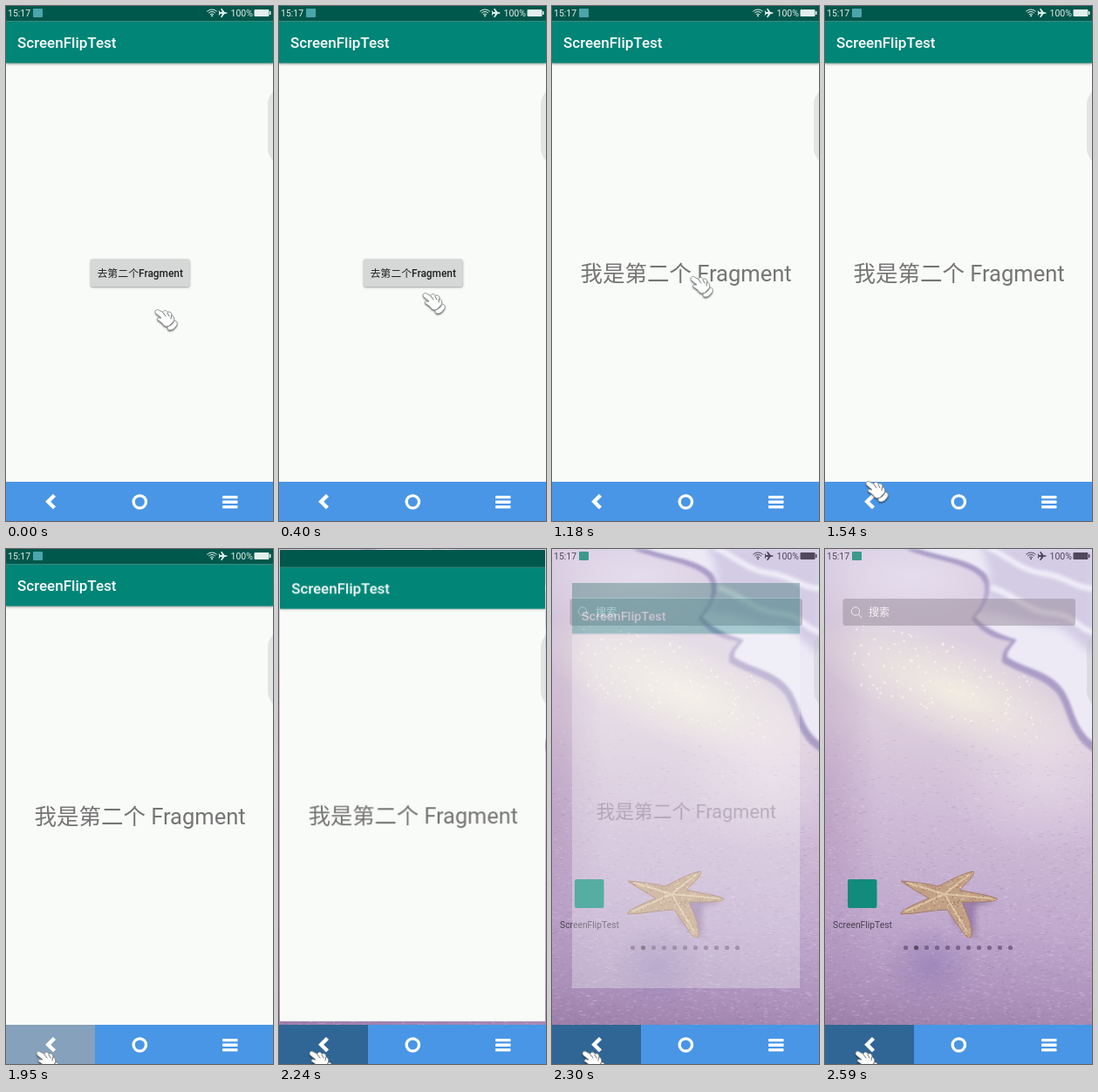
Animation of 306x591 px, one loop 2750 ms. Source, as an HTML page with a canvas:

```html
<!DOCTYPE html>
<html lang="zh-CN">
<head>
<meta charset="utf-8">
<title>Fragment demo</title>
<style>
html, body { margin: 0; width: 100%; height: 100%; overflow: hidden; }
canvas { display: block; width: 306px; height: 591px; }
</style>
</head>
<body>
<canvas id="stage" width="306" height="591"></canvas>
<script>
const W = 306, H = 591, NAV_Y = 546, LOOP = 2750, STEP = 30, CLOSE = 2240;
const APP_NAME = 'ScreenFlipTest';
const FONT = 'Roboto, "Noto Sans CJK SC", "Noto Sans CJK", sans-serif';
const stage = document.getElementById('stage').getContext('2d');

const clamp = v => Math.min(1, Math.max(0, v));
const lerp = (a, b, p) => a + (b - a) * p;
const mix = (a, b, p) => `rgb(${a.map((v, i) => Math.round(lerp(v, b[i], p)))})`;
const snap = (t, from) => from + Math.floor((t - from) / STEP) * STEP;

function layer() {
  const c = document.createElement('canvas');
  c.width = W;
  c.height = NAV_Y;
  return c.getContext('2d');
}

function rect(g, x, y, w, h, color, r = 0) {
  g.fillStyle = color;
  g.beginPath();
  g.roundRect(x, y, w, h, r);
  g.fill();
}

function disc(g, x, y, r, color) {
  g.fillStyle = color;
  g.beginPath();
  g.arc(x, y, r, 0, Math.PI * 2);
  g.fill();
}

function text(g, str, x, y, size, color, weight = 400, align = 'left') {
  g.font = `${weight} ${size}px ${FONT}`;
  g.textAlign = align;
  g.textBaseline = 'alphabetic';
  g.fillStyle = color;
  g.fillText(str, x, y);
}

function shape(g, d, fill, stroke, width = 1) {
  const p = new Path2D(d);
  if (fill) { g.fillStyle = fill; g.fill(p); }
  if (stroke) { g.strokeStyle = stroke; g.lineWidth = width; g.stroke(p); }
}

function statusBar(g, color, badge) {
  text(g, '15:17', 2, 12, 10.5, color);
  rect(g, 31, 3, 11, 10, badge, 1);
  g.strokeStyle = color;
  g.lineWidth = 1;
  for (const r of [3, 5.5, 8]) {
    g.beginPath();
    g.arc(236, 12, r, -Math.PI * .75, -Math.PI * .25);
    g.stroke();
  }
  disc(g, 236, 11.3, 1, color);
  shape(g, 'M254 8Q253 7 250.5 7L247.5 3H246L247.8 7H245.6L244.5 5.5H243.6L244.3 8L243.6 10.5H244.5L245.6 9H247.8L246 13H247.5L250.5 9Q253 9 254 8Z', color);
  text(g, '100%', 257.5, 12, 10.5, color);
  rect(g, 284.5, 4, 17, 8, color, 1);
  rect(g, 302, 6, 1.5, 4, color);
}

function withShadow(g, blur, dy, alpha, draw) {
  g.save();
  g.shadowColor = `rgba(0,0,0,${alpha})`;
  g.shadowBlur = blur;
  g.shadowOffsetY = dy;
  draw();
  g.restore();
}

function drawApp(g, t) {
  const closing = t >= CLOSE;
  // The closing window has a taller, empty status area.
  const inset = closing ? 20.4 : 17.5;
  rect(g, 0, 0, W, NAV_Y, '#f9fbf8');
  withShadow(g, 3, 1, .4, () => rect(g, 0, inset, W, 48, '#008577'));
  rect(g, 0, 0, W, inset, '#00574b');
  if (!closing) statusBar(g, '#e2efec', '#4ba5ad');
  text(g, APP_NAME, 13, inset + 30.5, 17, '#fff', 500);

  if (t >= 1180) {
    text(g, '我是第二个 Fragment', 153.5, 315.5 + (inset - 17.5) / 2, 25.5, '#757575', 400, 'center');
    return;
  }
  const press = clamp((snap(t, 850) - 850) / 270);
  withShadow(g, lerp(2.5, 6, press), lerp(1, 2.5, press), .38,
    () => rect(g, 97, 290.5, 113.5, 31.5, '#d6d7d7', 2));
  if (press > 0) {
    g.save();
    g.beginPath();
    g.roundRect(97, 290.5, 113.5, 31.5, 2);
    g.clip();
    rect(g, 97, 290, 114, 33, `rgba(0,0,0,${.07 * press})`);
    disc(g, lerp(160, 153.5, press), 307, 65 * press, 'rgba(0,0,0,.09)');
    g.restore();
  }
  text(g, '去第二个Fragment', 153.7, 310.5, 11.9, '#202222', 500, 'center');
}

function glow(g, x, y, rx, ry, rgb, alpha, angle = 0) {
  g.save();
  g.translate(x, y);
  g.rotate(angle);
  g.scale(rx, ry);
  const grad = g.createRadialGradient(0, 0, 0, 0, 0, 1);
  grad.addColorStop(0, `rgba(${rgb},${alpha})`);
  grad.addColorStop(1, `rgba(${rgb},0)`);
  g.fillStyle = grad;
  g.fillRect(-1, -1, 2, 2);
  g.restore();
}

function drawFoam(g) {
  g.save();
  g.filter = 'blur(1.5px)';
  shape(g, 'M92 0C125 14 158 14 178 32C190 46 180 66 168 80C182 100 200 104 214 106C206 114 202 120 203 130C224 144 250 146 267 167C279 186 280 216 308 233V0Z', '#ab9cc6');
  shape(g, 'M98 -4C130 10 164 9 184 28C196 44 186 66 172 78C188 94 206 100 220 104C212 114 208 118 209 124C230 138 258 139 274 163C286 182 286 208 310 223V-4Z', '#edeaf6');
  g.filter = 'blur(5px)';
  shape(g, 'M175 -4C196 20 190 58 176 74C206 70 232 90 262 88C284 96 290 112 310 122V-4Z', 'rgba(205,197,226,.8)');
  g.filter = 'blur(2px)';
  shape(g, 'M186 -2C210 8 222 24 250 28S284 44 310 46M190 44C214 50 232 72 260 74S288 92 310 96', null, '#f3f1fa', 6);
  g.restore();
}

function drawStarfish(g, rnd) {
  const arms = 'M87 381C100 382 118 384 129 387C141 382 157 372 170 370Q174 373 154 391C168 395 184 396 197 401Q199 406 157 405C162 418 170 432 168 445Q164 449 156 437L140 414C122 414 105 419 87 419Q84 415 119 401C108 394 96 388 87 381Z';
  g.save();
  g.filter = 'blur(3px)';
  shape(g, 'M150 394L196 404L172 410L172 446L146 426Z', 'rgba(104,72,130,.45)');
  g.restore();
  g.save();
  g.lineJoin = 'round';
  shape(g, arms, '#c2a085', '#a17c6c', 1);
  shape(g, 'M94 383L137 396L166 373M137 396L192 401M137 396L163 439M137 396L92 416', null, '#dcc3a2', 2);
  g.clip(new Path2D(arms));
  for (let i = 0; i < 500; i++) {
    disc(g, 85 + rnd() * 114, 369 + rnd() * 78, .8, i % 2 ? 'rgba(110,72,62,.4)' : 'rgba(250,232,200,.55)');
  }
  g.restore();
}

function drawBeach(g) {
  const sand = g.createLinearGradient(0, 0, -50, NAV_Y);
  [[0, '#d6cadf'], [.2, '#dccfdf'], [.35, '#dccddd'], [.55, '#cebad6'],
   [.75, '#c0a9cd'], [.9, '#ad93bc'], [1, '#9b7ea8']].forEach(s => sand.addColorStop(...s));
  g.fillStyle = sand;
  g.fillRect(0, 0, W, NAV_Y);
  glow(g, 0, 300, 60, 320, '160,125,170', .35);
  glow(g, 150, 165, 180, 62, '250,246,226', .75, .4);
  glow(g, 250, 260, 110, 90, '240,228,238', .5);
  glow(g, 100, 30, 140, 75, '240,236,250', .55);

  let seed = 7;
  const rnd = () => (seed = seed * 16807 % 2147483647) / 2147483647;
  for (let i = 0; i < 3200; i++) {
    const y = 180 + Math.sqrt(rnd()) * 366;
    rect(g, rnd() * W, y, 1 + rnd() * 4, 1, i % 2 ? 'rgba(110,75,135,.12)' : 'rgba(255,245,255,.17)');
  }
  for (let i = 0; i < 160; i++) {
    const x = 30 + rnd() * 220;
    disc(g, x, 70 + x * .28 + rnd() * 85, .5 + rnd() * 1.2, 'rgba(255,253,238,.5)');
  }
  drawFoam(g);
  glow(g, 122, 478, 52, 48, '140,118,182', .5);
  drawStarfish(g, rnd);
}

function drawLauncher(g, t, beach) {
  g.drawImage(beach, 0, 0);
  statusBar(g, t < 2300 ? 'rgba(255,255,255,.65)' : '#51485c', '#3d998c');
  rect(g, 20.5, 57, 266.5, 31, 'rgba(145,132,147,.48)', 3);
  g.strokeStyle = '#eeeaf0';
  g.lineWidth = 1;
  g.beginPath();
  g.arc(35, 71.5, 4.7, 0, Math.PI * 2);
  g.moveTo(38.5, 75);
  g.lineTo(42, 79);
  g.stroke();
  text(g, '搜索', 50, 77, 12, '#f6f3f7');
  rect(g, 26, 379, 33.5, 33, '#118b7b', 2);
  text(g, APP_NAME, 43, 434.5, 10.3, '#4b4152', 400, 'center');
  for (let i = 0; i < 11; i++) {
    disc(g, 92.5 + 12 * i, 457.5, 2.6, i === 1 ? '#594961' : 'rgba(105,82,120,.75)');
  }
}

function drawNav(g, t) {
  const blue = [72, 150, 229], grey = [133, 161, 187];
  rect(g, 0, NAV_Y, W, H - NAV_Y, mix(blue, blue, 0));
  if (t >= 2080) rect(g, 0, NAV_Y, 102, 45, '#306696');
  else if (t >= 1850) rect(g, 0, NAV_Y, 102, 45, mix(blue, grey, t >= 1950 ? 1 : t >= 1880 ? .75 : .35));
  g.lineCap = 'butt';
  g.lineJoin = 'miter';
  shape(g, 'M55.5 561.5L48.2 568.7L55.5 576', null, '#fff', 4.4);
  g.lineWidth = 3.3;
  g.beginPath();
  g.arc(153.3, 569, 7.2, 0, Math.PI * 2);
  g.stroke();
  for (const y of [562, 567.6, 573.2]) rect(g, 248, y, 17.5, 3.3, '#fff', .7);
}

function handAt(t) {
  if (t < 340) return [170, 347];
  if (t < 1330) {
    const p = clamp((snap(t, 340) - 310) / 180);
    return [lerp(170, 158, p), lerp(347, 309, p)];
  }
  const s = snap(t, 1330);
  if (s <= 1540) {
    const q = clamp((s - 1300) / 240), p = q * (2 - q);
    return [lerp(158, 46, p), lerp(309, 544, p)];
  }
  const q = t >= 1850 ? 1 : clamp((s - 1540) / 310), p = q * q * (3 - 2 * q);
  return [lerp(46, 34, p), lerp(544, 575, p)];
}

function drawHand(g, [x, y]) {
  g.save();
  g.translate(x, y);
  g.lineJoin = 'round';
  g.lineCap = 'round';
  const glove = 'M1 4C1 1 4 1 6 2.5L10 4.5C11 1.5 14 2 15 4.5C18 3 20 5 20 8C23 9 23 13 22 15L16 21C12 21 10 19 9 17L5 14C2 13 3 10 6 11L8 11L2 6Z';
  const cuff = 'M15.5 20.5C18 21 22 17.5 22.5 14.5C25 13.5 27 16 26 18.5C24.5 22 21 25 18 25C15.5 25 14 22.5 15.5 20.5Z';
  withShadow(g, 2, 1.5, .6, () => shape(g, glove + cuff, '#fff'));
  shape(g, glove, '#fff', '#7f8482', .9);
  shape(g, cuff, '#fff', '#7f8482', .9);
  shape(g, 'M10 5L13 9M15 5.5L17 9M19.5 8.5L19 12', null, '#6f7472', 1);
  g.restore();
}

function drawHandle(g) {
  shape(g, 'M306 98C303 103 300 106 300 113V163C300 170 303 173 306 178Z', 'rgba(200,200,203,.45)');
}

const beachLayer = layer(), appLayer = layer();
drawBeach(beachLayer);

// Window scale and opacity for each step of the closing transition.
const closingSteps = [[.992, 1], [.955, .91], [.853, .3], [.79, .07], [.76, .02]];

function render(t) {
  const g = stage;
  drawApp(appLayer, t);
  if (t < CLOSE) {
    g.drawImage(appLayer.canvas, 0, 0);
  } else {
    drawLauncher(g, t, beachLayer.canvas);
    const step = closingSteps[Math.floor((t - CLOSE) / STEP)];
    if (step) {
      const [scale, alpha] = step;
      g.save();
      g.globalAlpha = alpha;
      g.translate(153.2, 271.5);
      g.scale(scale, scale);
      g.drawImage(appLayer.canvas, -153, -273);
      g.restore();
    }
  }
  drawHandle(g);
  drawNav(g, t);
  drawHand(g, handAt(t));
}

const start = performance.now();
function tick() {
  render((performance.now() - start) % LOOP);
  requestAnimationFrame(tick);
}
tick();
</script>
</body>
</html>
```
